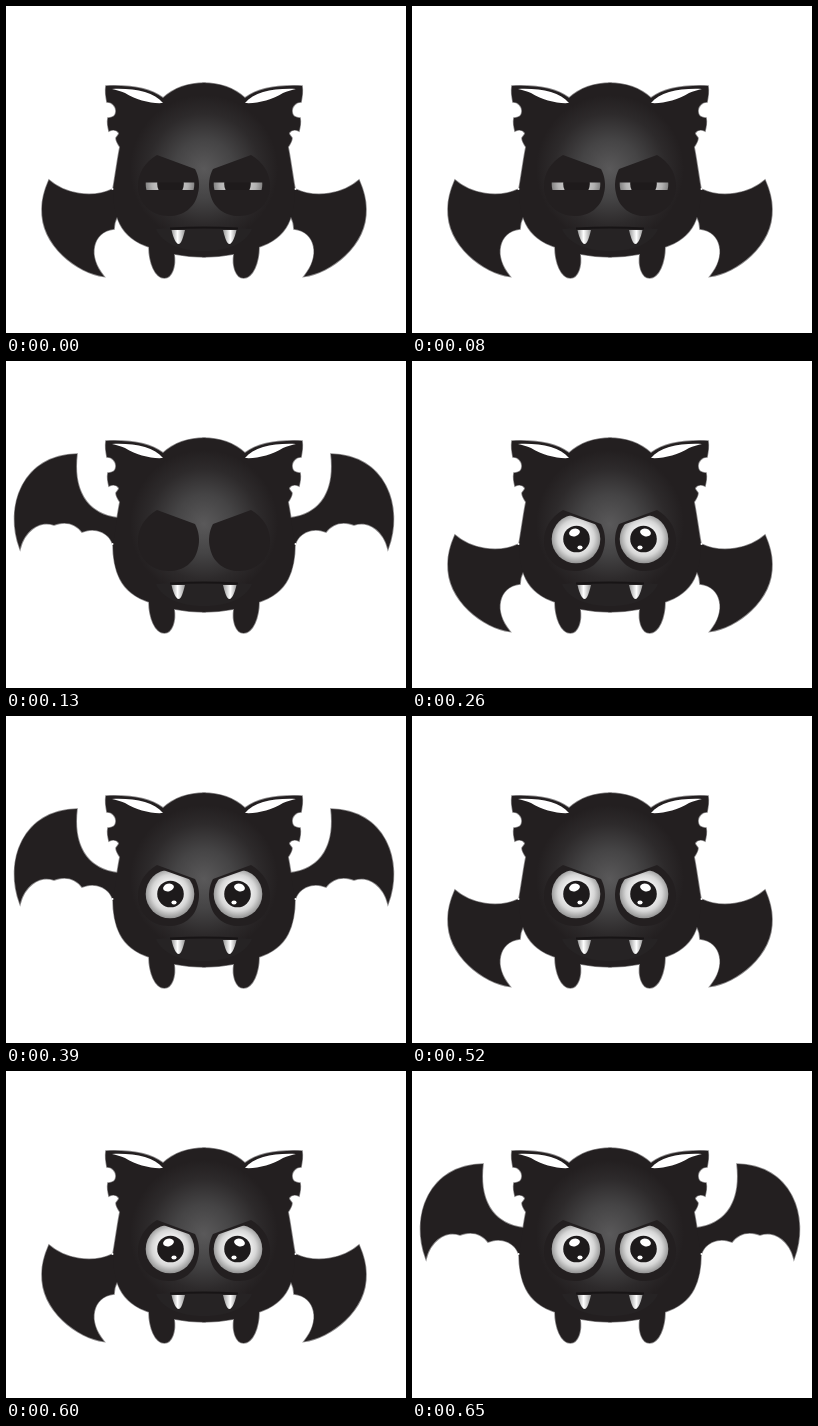
An HTML page for the animation above (780 ms loop, 400x327 px).

```html
<!DOCTYPE html>
<html lang="en">
<head>
<meta charset="utf-8">
<title>Flapping bat</title>
<style>
html, body { margin: 0; width: 100%; height: 100%; overflow: hidden; background: #fff; }
svg { display: block; width: 100vw; height: 100vh; }
</style>
</head>
<body>
<svg viewBox="0 0 400 327">
  <defs>
    <radialGradient id="glow" gradientUnits="userSpaceOnUse" cx="198" cy="163" r="74">
      <stop offset="0" stop-color="#5a595a"/>
      <stop offset=".4" stop-color="#454445"/>
      <stop offset=".75" stop-color="#2d2a2b"/>
      <stop offset="1" stop-color="#231f20"/>
    </radialGradient>
    <radialGradient id="white" gradientUnits="userSpaceOnUse" cx="164" cy="177" r="26">
      <stop offset=".4" stop-color="#f6f6f6"/>
      <stop offset=".7" stop-color="#d6d6d6"/>
      <stop offset="1" stop-color="#8c8c8c"/>
    </radialGradient>
    <linearGradient id="tooth">
      <stop offset="0" stop-color="#999"/>
      <stop offset=".45" stop-color="#fff"/>
      <stop offset="1" stop-color="#999"/>
    </linearGradient>
    <clipPath id="lids"><rect id="slit" x="130" width="70"/></clipPath>
    <clipPath id="brow"><path d="M130 145 L150 151.5 L191 166 V215 H130 Z"/></clipPath>

    <path id="body" d="M199 77 C182 77 168 82 157 92 C144 82 122 79 100 80
      C99 86 100 91 101 96 C106 96 110 100 110 105 C110 110 106 112 102 112
      C101 117 102 121 103 125 C107 123 111 124 113 127
      C113 129 111 130 110 132 C110 135 112 138 114 141
      C112 150 110 166 107 183 C107 197 109 208 114 218 C120 230 131 237 143 241
      C143 256 149 272 158.5 272 C166 272 170 260 168 248 C178 250 188 251 199 251 Z"/>
    <path id="down" d="M43 174 C59 188 86 193 107 183 L112 184 L111 211
      C109 215 108 219 108 223 C86 226 81 250 98 270.5
      C72 267 35 240 36 203 C36 193 39 183 43 174 Z"/>
    <path id="up" d="M71 93 C67 126 78 153 113 157 L119 180 L107 184
      C104 173 91 165 76 171 C69 162 59 160 48 164 C32 159 18 171 14 188
      C-2 145 17 94 71 93 Z"/>
    <path id="socket" d="M151 149 L189 163 C193 170 194 180 192 187
      C189 202 177 210 163 210 C145 210 132 197 132 180 C132 167 139 156 151 149 Z"/>

    <g id="features">
      <path d="M106 83 C128 82 148 86 157 97 C146 98 130 94 119 87 C115 85 110 84 106 83 Z" fill="#fff"/>
      <use href="#socket" fill="#231f20"/>
      <g id="eye" clip-path="url(#lids)">
        <g clip-path="url(#brow)">
          <circle cx="164" cy="178" r="24.3" fill="url(#white)"/>
          <circle cx="164.5" cy="178" r="13.3" fill="#1d1a1b"/>
          <ellipse cx="162.5" cy="171.5" rx="5.5" ry="3.8" fill="#fff" transform="rotate(-15 162.5 171.5)"/>
          <ellipse cx="168" cy="186.5" rx="2.6" ry="2" fill="#fff"/>
        </g>
      </g>
      <path d="M165.5 224 H179 C177.5 230 175.5 238 172.5 238 C170 238 167 231 165.5 224 Z" fill="url(#tooth)"/>
    </g>

    <g id="half">
      <use class="wing"/>
      <use href="#body"/>
    </g>
  </defs>

  <g fill="#8b898a" stroke="#8b898a" stroke-width="1.6">
    <use href="#half"/>
    <use href="#half" transform="matrix(-1 0 0 1 396 0)"/>
  </g>
  <g fill="#231f20">
    <use href="#half"/>
    <use href="#half" transform="matrix(-1 0 0 1 396 0)"/>
  </g>
  <circle cx="198" cy="163" r="74" fill="url(#glow)"/>
  <path d="M150 223 C175 221 221 221 246 223 C240 238 220 245 198 245 C176 245 156 238 150 223 Z" fill="#262324"/>
  <path d="M164 222.5 Q198 220.5 232 222.5" fill="none" stroke="#171415" stroke-width="2.2"/>
  <use href="#features"/>
  <use href="#features" transform="matrix(-1 0 0 1 396 0)"/>
  <g fill="#fff">
    <circle cx="106.5" cy="183" r="1"/>
    <circle cx="289.5" cy="183" r="1"/>
  </g>
</svg>
<script>
const STEP = 130, STEPS = 6;
const wing = document.querySelector('.wing');
const eye = document.getElementById('eye');
const slit = document.getElementById('slit');

// Wings alternate each step; the eyes go from a dim slit to shut, then stay open.
function draw(time) {
  const step = Math.floor(time / STEP) % STEPS;
  wing.setAttribute('href', step % 2 ? '#up' : '#down');
  eye.setAttribute('visibility', step === 1 ? 'hidden' : 'visible');
  eye.setAttribute('opacity', step ? 1 : .8);
  slit.setAttribute('y', step ? 150 : 176.5);
  slit.setAttribute('height', step ? 60 : 7.5);
}

const start = performance.now();
function tick() {
  draw(performance.now() - start);
  requestAnimationFrame(tick);
}
draw(0);
requestAnimationFrame(tick);
</script>
</body>
</html>
```
